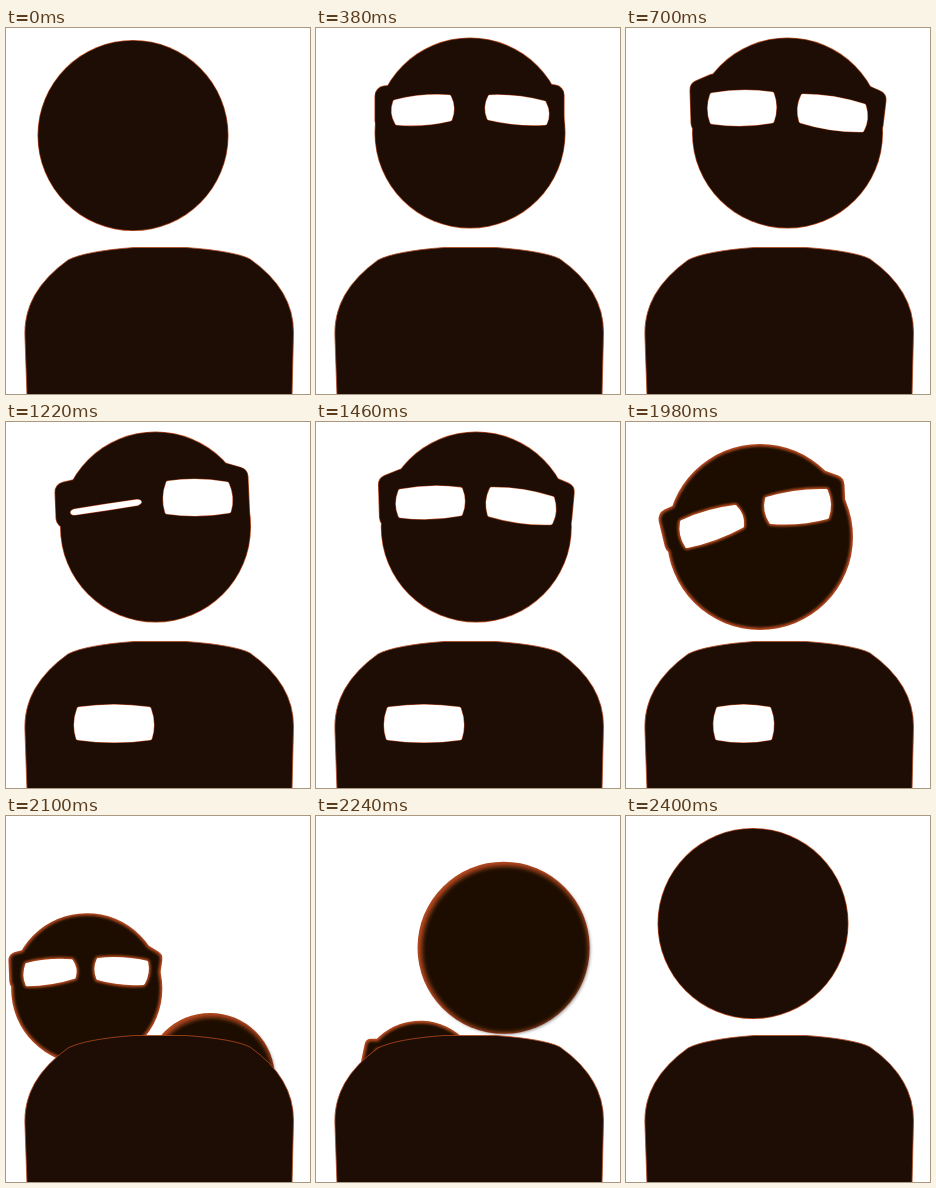
These frames come from a looping animation (304x366 px, 2420 ms). An HTML page:

```html
<!DOCTYPE html>
<html lang="en">
<head>
<meta charset="utf-8">
<title>Avatar with glasses</title>
<style>
html, body { margin: 0; width: 100%; height: 100%; overflow: hidden; background: #fff; }
svg { display: block; width: 100%; height: 100%; }
.dark { fill: #1d0d05; }
.rim { fill: #b4491f; }
.arm { fill: none; stroke-linecap: round; stroke-linejoin: round; }
.rim .arm { stroke: #b4491f; }
.dark .arm { stroke: #1d0d05; }
.lens { stroke-linejoin: round; }
.edge { fill: #b4491f; stroke: #b4491f; }
.glass { fill: #fff; stroke: #fff; }
</style>
</head>
<body>
<svg viewBox="0 0 304 366">
  <defs>
    <filter id="soft" x="-20%" y="-20%" width="140%" height="140%"><feGaussianBlur/></filter>
    <filter id="softNew" x="-20%" y="-20%" width="140%" height="140%"><feGaussianBlur/></filter>
  </defs>
  <g id="newHead">
    <circle class="rim"/>
    <circle class="dark" filter="url(#softNew)"/>
  </g>
  <g id="head">
    <g class="rim"><circle/><polyline class="arm"/><polyline class="arm"/></g>
    <g class="dark" filter="url(#soft)"><circle/><polyline class="arm"/><polyline class="arm"/></g>
    <g filter="url(#soft)"><path class="lens edge"/><path class="lens edge"/></g>
    <path class="lens glass"/><path class="lens glass"/>
  </g>
  <path class="dark" stroke="#b4491f" stroke-width=".8" d="M21 368 L19 310 Q16 265 62 232 Q80 223 128 219.5 L180 219.5 Q228 223 244 231 Q288 262 287.5 305 L286 368 Z"/>
  <g id="pocket"><path class="lens edge"/><path class="lens glass"/></g>
</svg>
<script>
const LOOP = 2420;
const $ = (q, root = document) => root.querySelector(q);
const $$ = (q, root) => [...root.querySelectorAll(q)];
const set = (el, attrs) => { for (const k in attrs) el.setAttribute(k, attrs[k]); };

// Smooth track through rows of [time, ...values], without overshoot.
function at(keys, t) {
  const last = keys.length - 1;
  if (t <= keys[0][0]) return keys[0].slice(1);
  if (t >= keys[last][0]) return keys[last].slice(1);
  const i = keys.findIndex(k => k[0] > t) - 1;
  const a = keys[i], b = keys[i + 1], span = b[0] - a[0], u = (t - a[0]) / span;
  const slope = (j, c) => j < 0 || j >= last ? 0 : (keys[j + 1][c] - keys[j][c]) / (keys[j + 1][0] - keys[j][0]);
  const tangent = (j, c) => {
    const p = slope(j - 1, c), q = slope(j, c);
    return p * q > 0 ? 2 * p * q / (p + q) : 0;
  };
  const u2 = u * u, u3 = u2 * u;
  return a.slice(1).map((v, n) => {
    const c = n + 1;
    return v * (2 * u3 - 3 * u2 + 1) + b[c] * (3 * u2 - 2 * u3)
      + span * (tangent(i, c) * (u3 - 2 * u2 + u) + tangent(i + 1, c) * (u3 - u2));
  });
}

// A pose: head x, y, r, lens opening; lens corners; three points per arm.
const front = [154, 105, 95.5, 1,
  79, 74, 133, 69, 134, 91, 81, 95,   174, 69, 228, 75, 229, 95, 173, 90,
  78, 67, 69, 68, 69, 93,   230, 66, 238, 67, 238, 93];
const wink = [149.5, 105, 95.5, 1,
  69, 89, 131, 79.5, 131, 81.5, 69, 91,   162, 61, 221, 62, 223, 89, 161, 90,
  72, 67, 59, 70, 60, 96,   218, 51, 232, 55, 234, 100];
const tilt = [161.5, 105, 95.5, 1,
  86, 67, 146, 66, 146, 93, 86, 94,   177, 68, 238, 78, 236, 102, 175, 93,
  88, 56, 74, 62, 75, 95,   241, 68, 250, 72, 247, 97];
const lean = [134, 115, 93, 1,
  56, 100, 109, 85, 116, 104, 61, 124,   141, 77, 200, 69, 201, 95, 145, 100,
  56, 91, 43, 97, 49, 122,   197, 59, 208, 63, 209, 85];

// Bare head: lenses shut on their centre line, arms tucked inside.
const bare = front.map((v, i) => {
  if (i < 4) return [127, 107.5, 95.5, 0][i];
  const odd = i % 2;
  if (i >= 20) return odd ? 107.5 + (v - 105) * .7 : 127 + (v - 154) * .7;
  return odd ? 83 : v - 27;
});

const poses = [[20, bare], [380, front], [700, tilt], [1040, tilt], [1220, wink],
  [1520, tilt], [1740, tilt], [1980, lean]].map(([t, p]) => [t, ...p]);

// x, y, scale, turn, glow
const sink = [[1740, 134, 115, 1, 0, .7], [1980, 134, 115, 1, 0, 2.4], [2110, 80, 178, .8, 12, 3],
  [2240, 104, 265, .656, 25, 4], [2310, 150, 305, .6, 35, 4]];
// x, y, r, glow
const rise = [[2060, 190, 305, 60, 4], [2110, 207, 250, 66, 4], [2170, 218, 180, 75, 4],
  [2240, 188, 132, 86, 4], [2400, 127, 107.5, 95.5, .7]];
// left edge, right edge
const flap = [[1040, 73, 73], [1180, 73, 143], [1880, 73, 143], [1980, 92, 143], [2080, 143, 143]];

// Four-sided shape with bulging edges.
function barrel(c) {
  const pts = [0, 2, 4, 6].map(i => [c[i], c[i + 1]]);
  const mid = pts.map((p, i) => { const q = pts[(i + 1) % 4]; return [(p[0] + q[0]) / 2, (p[1] + q[1]) / 2]; });
  let d = `M${pts[0]}`;
  mid.forEach((m, i) => {
    const o = mid[(i + 2) % 4], dx = m[0] - o[0], dy = m[1] - o[1];
    const len = Math.hypot(dx, dy) || 1, k = Math.min(5, len * .2) / len;
    d += `Q${m[0] + dx * k} ${m[1] + dy * k} ${pts[(i + 1) % 4]}`;
  });
  return d + 'Z';
}

const head = $('#head'), newHead = $('#newHead'), pocket = $('#pocket');
const circles = $$('circle', head), arms = $$('polyline', head);
const edges = $$('.edge', head), glasses = $$('.glass', head);
const [newRim, newDark] = $$('circle', newHead);
const blur = $('#soft feGaussianBlur'), blurNew = $('#softNew feGaussianBlur');

function drawLens(edge, glass, corners, open, glow) {
  const d = barrel(corners), display = open > .01 ? '' : 'none';
  set(edge, { d, display, 'stroke-width': (4 + 1.6 * glow) * open });
  set(glass, { d, display, 'stroke-width': 4 * open });
}

function drawHead(t) {
  const p = at(poses, t), [x, y, s, turn, glow] = at(sink, t);
  const [cx, cy, r, open] = p;
  set(head, { transform: t > 1980 ? `translate(${x} ${y}) rotate(${turn}) scale(${s}) translate(-134 -115)` : '' });
  set(blur, { stdDeviation: glow * .5 });
  circles.forEach((c, i) => set(c, { cx, cy, r: r - i * glow }));
  arms.forEach((a, i) => {
    const from = 20 + i % 2 * 6;
    set(a, { points: p.slice(from, from + 6).join(' '), 'stroke-width': i < 2 ? 21 : 21 - 2 * glow });
  });
  [0, 1].forEach(i => drawLens(edges[i], glasses[i], p.slice(4 + i * 8, 12 + i * 8), open, glow));
}

function drawNewHead(t) {
  const [cx, cy, r, glow] = at(rise, t), shift = (glow - .7) * .5;
  set(newHead, { display: t > 2060 ? '' : 'none' });
  set(newRim, { cx, cy, r });
  set(newDark, { cx: cx + shift, cy: cy + shift, r: r - glow * .6 - .3 });
  set(blurNew, { stdDeviation: glow * .5 });
}

function drawPocket(t) {
  const [l, r] = at(flap, t);
  const open = Math.min(1, (r - l) / 8);
  drawLens($('.edge', pocket), $('.glass', pocket), [l, 287, r, 287, r + open, 316, l - open, 316], open, .7);
}

function draw(t) {
  drawHead(t);
  drawNewHead(t);
  drawPocket(t);
}

const start = performance.now();
function tick() {
  draw((performance.now() - start) % LOOP);
  requestAnimationFrame(tick);
}
draw(0);
requestAnimationFrame(tick);
</script>
</body>
</html>
```
